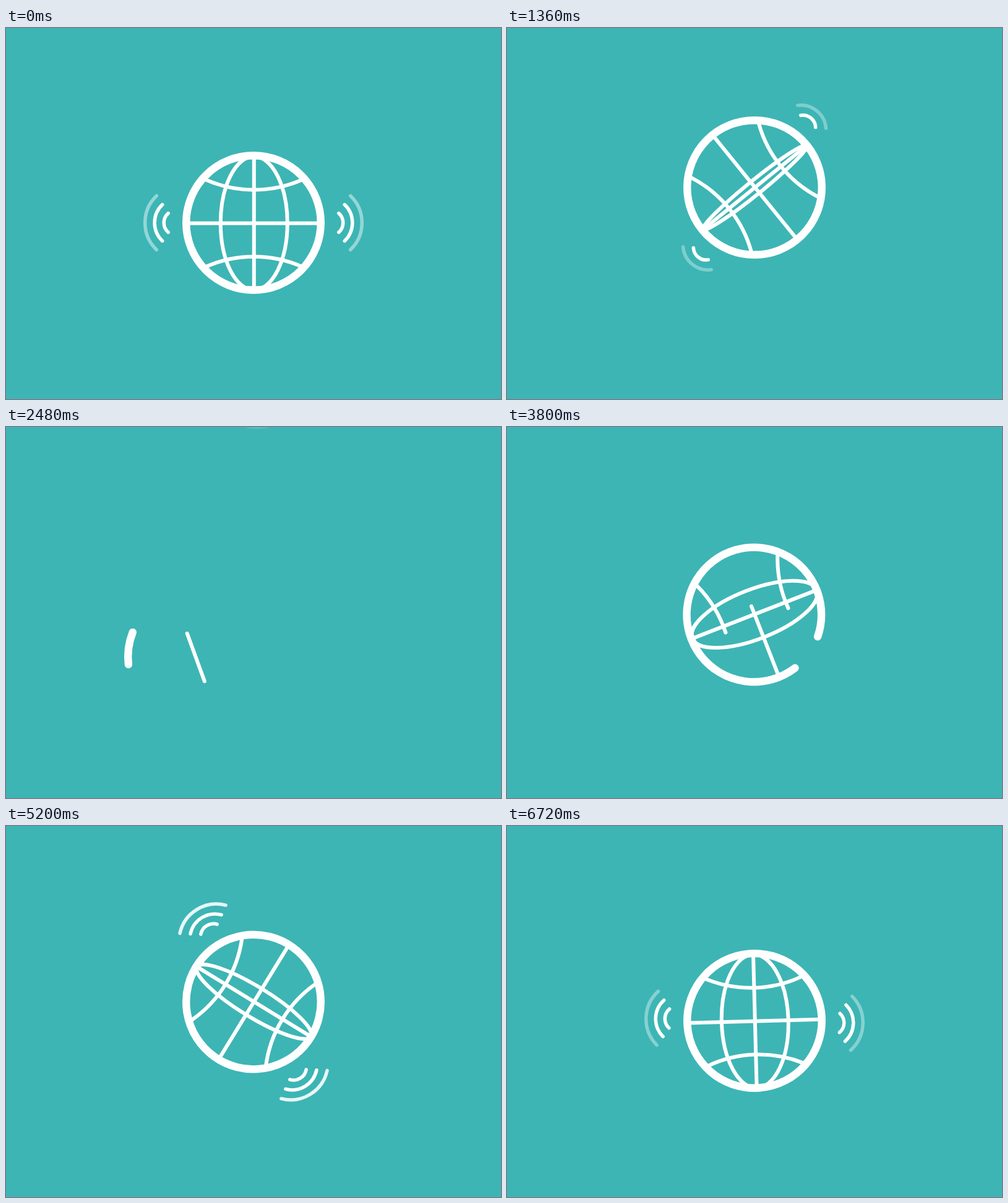
Write an HTML page that moves like this. It is 800 px wide and 600 px high and loops after 6760 ms.

```html
<!DOCTYPE html>
<html lang="en">
<head>
<meta charset="utf-8">
<title>Spinning globe</title>
<style>
  html, body { margin: 0; width: 100%; height: 100%; overflow: hidden; background: #3db5b5; }
  svg { display: block; width: 100vw; height: 100vh; }
  svg * { fill: none; stroke: #fff; stroke-linecap: round; }
</style>
</head>
<body>
<svg id="stage" viewBox="0 0 800 600"></svg>
<script>
const LOOP = 6760, FRAME = 40, SPIN = 37.5 / 1000, WAVE_CYCLE = 1800;
const ENTER = 1960, LEAVE = 2600, WAVES_BACK = 3960, APEX = 5100;
const stage = document.getElementById('stage');

const clamp = v => Math.max(0, Math.min(1, v));
const ramp = (t, from, to) => clamp((t - from) / (to - from));
const smooth = v => v * v * (3 - 2 * v);

function add(parent, tag, attrs = {}) {
  const node = document.createElementNS('http://www.w3.org/2000/svg', tag);
  parent.appendChild(node);
  return set(node, attrs);
}

function set(node, attrs) {
  for (const key in attrs) node.setAttribute(key, attrs[key]);
  return node;
}

// Shows the first part of a path whose length is normalised to 1.
function reveal(node, part) {
  set(node, {
    visibility: part > 0 ? 'inherit' : 'hidden',
    'stroke-dasharray': part < 1 ? `${part} 2` : 'none'
  });
}

function makeGlobe() {
  const root = add(stage, 'g');
  const lines = add(root, 'g', { 'stroke-width': 6 });
  const line = d => add(lines, 'path', { d, pathLength: 1 });
  const globe = {
    root, lines,
    meridian: line('M0-106V106'),
    equator: line('M106 0H-106'),
    parallels: [line('M-77-70A193 193 0 0 0 77-70'), line('M-77 70A193 193 0 0 1 77 70')],
    oval: add(lines, 'ellipse', { ry: 108, pathLength: 1 }),
    ring: add(root, 'circle', { r: 108.8, 'stroke-width': 12.4, pathLength: 360 }),
    waves: add(root, 'g', { 'stroke-width': 5.5 })
  };
  // Each wave: distance of its ends, half height, radius.
  globe.arcs = [[137.8, 15.4, 20.5], [147.2, 29.4, 40.5], [156.8, 43.5, 60.4]].map(([x, h, r]) =>
    add(globe.waves, 'path', {
      d: `M${x} ${-h}A${r} ${r} 0 0 1 ${x} ${h}M${-x} ${-h}A${r} ${r} 0 0 0 ${-x} ${h}`
    }));
  return globe;
}

function pose(globe, x, y, angle, swing, phase) {
  const radians = swing * Math.PI / 180;
  const wobble = 0.7 * Math.cos(2 * radians);
  set(globe.root, { transform: `translate(${x} ${y})` });
  set(globe.lines, { transform: `translate(.8 ${wobble}) rotate(${angle})` });
  set(globe.oval, { rx: Math.abs(54 * Math.cos(2 * radians)) });
  set(globe.waves, { transform: `rotate(${-swing})` });
  const out = 1 - ramp(phase, 1400, 1720);
  const rise = [[0, 320], [490, 700], [750, 1310]];
  globe.arcs.forEach((arc, i) =>
    set(arc, { 'stroke-opacity': phase < 0 ? 0 : ramp(phase, ...rise[i]) * out }));
}

const leaving = makeGlobe(), arriving = makeGlobe();

function drawLeaving(t) {
  set(leaving.root, { visibility: t < LEAVE ? 'visible' : 'hidden' });
  const turn = t * SPIN;
  pose(leaving, 400, 315 - 57 * (t / 1360) ** 3.58, turn, turn, (t + 1000) % WAVE_CYCLE);
}

function drawArriving(t) {
  set(arriving.root, { visibility: t >= ENTER ? 'visible' : 'hidden' });
  if (t < ENTER) return;

  const drift = Math.max(0, (4100 - t) / 1620) ** 2.9;
  const climb = Math.max(0, (APEX - t) / 1300);
  const x = 400 - 94 * drift;
  const y = 284.2 + 18.9 * climb ** 2 + 0.33 * climb ** 5 + 30.8 * smooth(ramp(t, APEX, LOOP));
  const turn = 180 - (LOOP - t) * SPIN;
  const phase = t < WAVES_BACK ? -1 : (t - WAVES_BACK) % WAVE_CYCLE;
  pose(arriving, x, y, turn - 39.5 * drift, turn, phase);

  const sweep = 28 * ((t - ENTER) / 520) ** 1.944;
  set(arriving.ring, {
    transform: `rotate(${173.6 + (t - 2480) * 0.181})`,
    'stroke-dasharray': sweep < 360 ? `${sweep} 720` : 'none'
  });

  // The meridian grows outwards from the middle.
  const half = 106 * ramp(t, 2200, 2920);
  set(arriving.meridian, {
    d: `M0 ${-half}V${half}`,
    visibility: half > 0 ? 'inherit' : 'hidden'
  });
  reveal(arriving.oval, ramp(t, 2800, 3560));
  const grid = ramp(t, 3460, 4060);
  reveal(arriving.equator, grid);
  arriving.parallels.forEach(p => reveal(p, grid));
}

function render(now) {
  const t = Math.floor((now % LOOP) / FRAME) * FRAME;
  drawLeaving(t);
  drawArriving(t);
}

const start = performance.now();
function tick() {
  render(performance.now() - start);
  requestAnimationFrame(tick);
}
tick();
</script>
</body>
</html>
```
